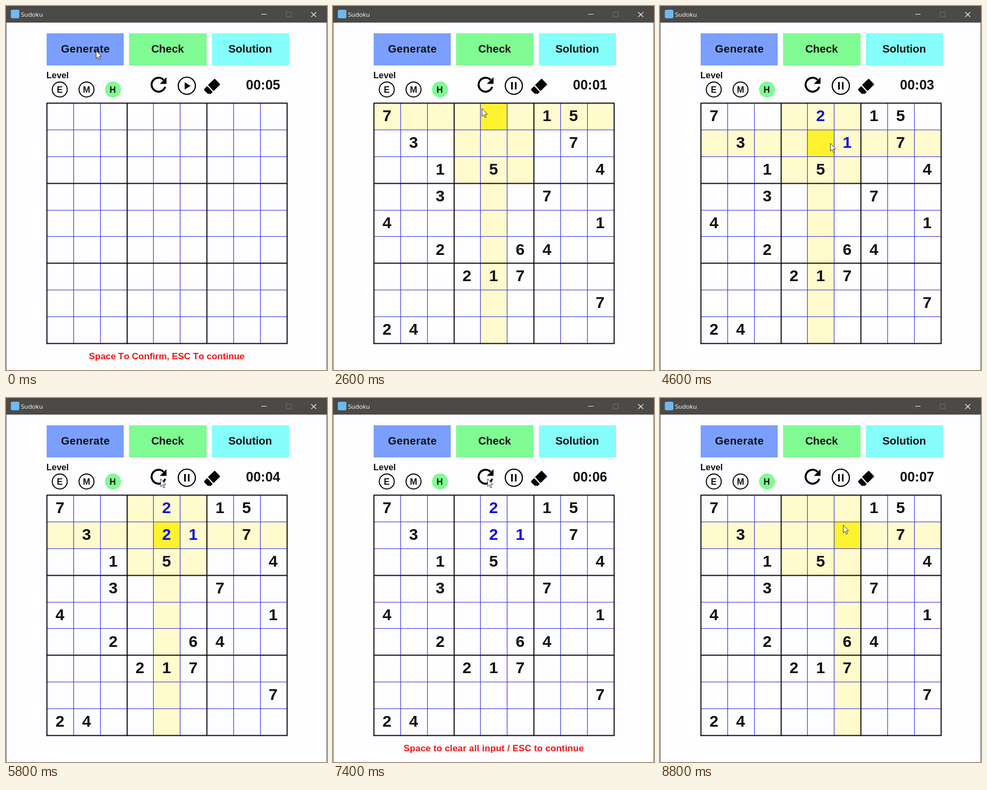
Animation, 600 px wide and 680 px high, one loop 9000 ms. Source, as an HTML page:

```html
<!DOCTYPE html>
<html lang="en">
<head>
<meta charset="utf-8">
<title>Sudoku</title>
<style>
  html, body { margin: 0; width: 100%; height: 100%; overflow: hidden; background: #fefdff; }
  svg { display: block; }
  text { font-family: "Liberation Sans", Arial, sans-serif; font-weight: 700; fill: #111; font-kerning: none; }
  .mid { text-anchor: middle; }
  .title { font: 400 11.6px "Open Sans", "Noto Sans", sans-serif; fill: #fff; }
  .button { font-size: 20.4px; }
  .label { font-size: 16.4px; }
  .clock { font-size: 25px; }
  .digit { font-size: 30px; }
  .note { font-size: 17px; fill: #f51414; }
  .entry { fill: #1010e0; }
</style>
</head>
<body>
<svg id="stage" width="600" height="680" viewBox="0 0 600 680">
  <rect width="600" height="680" fill="#fefdff"/>
  <path d="M.5 30V680M599.5 30V680" stroke="#6b6a69"/>
  <rect width="600" height="31" fill="#4b4a47"/>
  <rect x="9" y="7" width="16" height="16" rx="3" fill="#6db9f0"/>
  <text class="title" x="28" y="20">Sudoku</text>
  <path d="M477 15.5H487" stroke="#eee"/>
  <rect x="524" y="11.5" width="9" height="9" fill="none" stroke="#75736f"/>
  <path d="M570.5 11.5L580 20.500M580 11.500L570.5 20.500" stroke="#f4f4f4" stroke-width="1.1"/>

  <rect x="76" y="51" width="144" height="60" fill="#7b9ffe"/>
  <rect x="230" y="51" width="145" height="60" fill="#80fb94"/>
  <rect x="385" y="51" width="144" height="60" fill="#85fefc"/>
  <text class="button mid" x="148.500" y="87" letter-spacing=".4">Generate</text>
  <text class="button mid" x="302" y="87">Check</text>
  <text class="button mid" x="456.500" y="87">Solution</text>

  <text class="label" x="75.500" y="135">Level</text>
  <g fill="none" stroke="#0a0a0a" stroke-width="2">
    <circle cx="100.500" cy="156" r="14"/>
    <circle cx="150.500" cy="156" r="14"/>
  </g>
  <circle cx="200" cy="156" r="15" fill="#80fb94"/>
  <text class="label mid" x="100.500" y="162">E</text>
  <text class="label mid" x="150.500" y="162">M</text>
  <text class="label mid" x="199.500" y="162">H</text>

  <!-- restart -->
  <path d="M294.500 138A13 13 0 1 0 297.500 151" fill="none" stroke="#000" stroke-width="3.700"/>
  <path d="M300 133V145.500H287.500Z"/>
  <!-- play / pause -->
  <circle cx="338" cy="149" r="16" fill="none" stroke="#000" stroke-width="2.200"/>
  <path id="play" d="M334 142.500V156L345 149.200Z"/>
  <path id="pause" d="M334.500 142V156M341.500 142V156" stroke="#000" stroke-width="3"/>
  <!-- eraser -->
  <g stroke="#000" stroke-width="2" stroke-linejoin="round">
    <path d="M379 147.500L390 137L399 146.500L388 157.500Z"/>
    <path d="M376 151L385 160.500L382.500 163H377.500L371.500 157V155.500Z"/>
  </g>
  <text id="clock" class="clock" x="448.500" y="156"></text>

  <g id="shade"></g>
  <g id="grid"></g>
  <g id="digits"></g>
  <text id="note" class="note mid" x="300.500" y="660"></text>
  <path id="cursor" d="M.5 .5V15L3.800 12L6.200 17.500L8.400 16.500L6 11.200H10.500Z" fill="#fff" stroke="#222" stroke-width=".9"/>
</svg>
<script>
const LOOP = 9000, TICK = 200;
const $ = id => document.getElementById(id);

function add(parent, tag, attrs, text = "") {
  const el = document.createElementNS("http://www.w3.org/2000/svg", tag);
  for (const k in attrs) el.setAttribute(k, attrs[k]);
  el.textContent = text;
  parent.append(el);
  return el;
}

const show = (el, on) => { el.style.display = on ? "" : "none"; };
const lineX = i => Math.floor(76.6 + 49.83 * i) + .5;
const lineY = i => Math.floor(181.8 + 49.83 * i) + .5;

// Grid lines, thick ones last
for (const thick of [false, true]) {
  for (let i = 0; i < 10; i++) {
    if ((i % 3 === 0) !== thick) continue;
    const x = lineX(i), y = lineY(i);
    add($("grid"), "path", {
      d: `M${x} 181V631.500M76 ${y}H526`,
      stroke: thick ? "#0a0a0a" : "#3030d8",
      "stroke-width": thick ? 2 : 1.1
    });
  }
}

// Cell backgrounds
const cells = [];
for (let r = 0; r < 9; r++) {
  for (let c = 0; c < 9; c++) {
    const x = lineX(c), y = lineY(r);
    const el = add($("shade"), "rect", { x, y, width: lineX(c + 1) - x, height: lineY(r + 1) - y });
    cells.push({ r, c, el });
  }
}

const putDigit = (r, c, n, cls = "") => add($("digits"), "text", {
  class: "digit mid " + cls, x: 100.8 + 49.83 * c, y: 215 + 49.9 * r
}, n);

const puzzle = [
  "7.....15.", ".3.....7.", "..1.5...4",
  "..3...7..", "4.......1", "..2..64..",
  "...217...", "........7", "24......."
];
const givens = [];
puzzle.forEach((row, r) => [...row].forEach((n, c) => {
  if (n !== ".") givens.push(putDigit(r, c, n));
}));

const START = 1400, CLEAR = 7600;
const entries = [[0, 4, 2, 2800], [1, 5, 1, 4000], [1, 4, 2, 5000]]
  .map(([r, c, n, from]) => ({ from, el: putDigit(r, c, n, "entry") }));

// [time, row, column]; no cell means nothing selected
const picks = [[0], [2600, 0, 4], [3800, 1, 5], [4600, 1, 4], [6200], [8800, 1, 5]];

// [time, x, y]
const path = [
  [0, 168, 83], [1600, 168, 83], [2400, 278, 191], [3000, 278, 191],
  [3600, 347, 251], [4000, 347, 251], [4600, 318, 256], [5000, 318, 256],
  [5400, 339, 262], [5800, 288.5, 150.5], [8000, 288.5, 150.5],
  [8600, 342, 237], [LOOP, 342, 237]
];

function cursorAt(t) {
  const i = path.findIndex(p => p[0] > t);
  const [t0, x0, y0] = path[i - 1], [t1, x1, y1] = path[i];
  const k = (t - t0) / (t1 - t0), e = k * k * (3 - 2 * k);
  return [x0 + (x1 - x0) * e, y0 + (y1 - y0) * e];
}

function noteAt(t) {
  if (t < START) return "Space To Confirm, ESC To continue";
  if (t >= 6200 && t < CLEAR) return "Space to clear all input / ESC to continue";
  return "";
}

function shade(t) {
  const [, row, col] = picks.filter(p => p[0] <= t).pop();
  const box = (r, c) => Math.floor(r / 3) * 3 + Math.floor(c / 3);
  for (const { r, c, el } of cells) {
    const hit = r === row && c === col;
    const near = r === row || c === col || box(r, c) === box(row, col);
    el.setAttribute("fill", hit ? "#fff22f" : near ? "#fffbcd" : "none");
  }
}

function render(t) {
  const running = t >= START;
  show($("play"), !running);
  show($("pause"), running);
  $("clock").textContent = "00:0" + (running ? Math.floor((t - START) / 1000) : 5);
  givens.forEach(el => show(el, running));
  entries.forEach(e => show(e.el, t >= e.from && t < CLEAR));
  shade(t);
  const note = noteAt(t);
  $("note").textContent = note;
  $("note").setAttribute("letter-spacing", t < START ? 0 : .15);
  $("cursor").setAttribute("transform", `translate(${cursorAt(t)})`);
}

const begin = performance.now();
let last = -1;
function frame() {
  const t = Math.floor((performance.now() - begin) % LOOP / TICK) * TICK;
  if (t !== last) render(last = t);
  requestAnimationFrame(frame);
}
frame();
</script>
</body>
</html>
```
